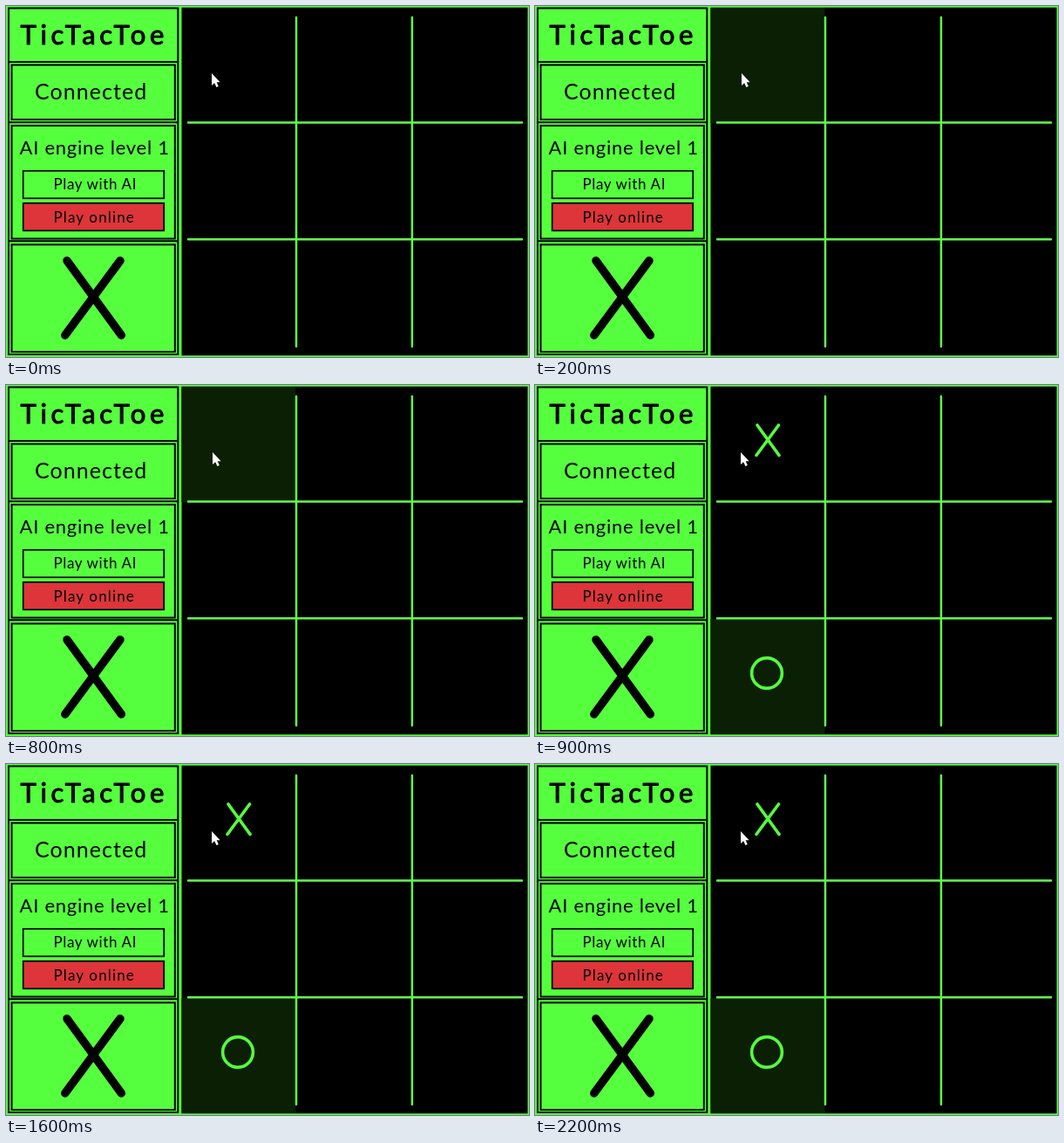
Animation of 600x402 px, one loop 2300 ms. Source, as an HTML page:

```html
<!DOCTYPE html>
<html lang="en">
<head>
<meta charset="utf-8">
<title>Tic-tac-toe</title>
<style>
  html, body { margin: 0; width: 100%; height: 100%; overflow: hidden; background: #55ff3d; }
  svg { display: block; width: 600px; height: 402px; }
  text { font-family: Lato, "Open Sans", sans-serif; fill: #000; }
  .title { stroke: #000; stroke-width: 1; stroke-linejoin: round; }
  .frame { fill: none; stroke: #000; stroke-width: 2; }
  .button { stroke-width: 1.7; }
  .mark, .grid { fill: none; stroke: #55ff3d; stroke-linecap: round; }
  .mark { stroke-width: 3.6; }
  .grid { stroke: #62fb4e; stroke-width: 2.5; }
  .hover { fill: #0a1f03; }
</style>
</head>
<body>
<svg viewBox="0 0 600 402">
  <rect width="600" height="402" fill="#55ff3d"/>

  <g class="frame">
    <path d="M3 2.5H197.3V399H3ZM3 64H197M3 133.3H197M3 269.3H197"/>
    <rect x="6.5" y="67.5" width="187.3" height="62.5"/>
    <rect x="6.5" y="137" width="187.3" height="129.5"/>
    <rect x="6.5" y="273.3" width="187.3" height="122.7"/>
    <rect class="button" x="19.7" y="188.8" width="161.5" height="31.5"/>
    <rect class="button" x="19.7" y="225.8" width="161.5" height="31.5" fill="#dd3539"/>
    <path d="M70 291.7L132.3 377M131 291.7L67.8 377" stroke-width="9.5" stroke-linecap="round"/>
  </g>

  <text class="title" x="16.5" y="43.5" font-size="31" letter-spacing="4.7">TicTacToe</text>
  <text x="33" y="107" font-size="25" letter-spacing="1.05">Connected</text>
  <text x="15.5" y="170" font-size="22" letter-spacing=".74">AI engine level 1</text>
  <text x="54.5" y="210" font-size="17" letter-spacing=".65">Play with AI</text>
  <text x="54.5" y="248" font-size="17" letter-spacing="1.15">Play online</text>

  <rect x="201.5" y="1.7" width="397" height="398.6" fill="#000"/>
  <rect id="hover" class="hover" x="201.5" width="131" height="132"/>
  <path class="grid" d="M333 13V390M465.9 13V390M209 133.4H592M209 267.3H592"/>
  <g id="marks" class="mark">
    <path d="M255 46L280 80.5M279.5 46L254 80.5"/>
    <circle cx="266" cy="330" r="17.4"/>
  </g>
  <path id="cursor" d="M0 0V14L3.2 11.2L5.4 16L7.8 15L5.7 10.3H9.6Z" fill="#fff"/>
</svg>
<script>
  const LOOP = 2300, POINT_AT = 100, PLAY_AT = 900;
  const byId = id => document.getElementById(id);
  const hover = byId('hover'), marks = byId('marks'), cursor = byId('cursor');

  function draw(time) {
    const pointing = time >= POINT_AT && time < PLAY_AT;
    const played = time >= PLAY_AT;
    hover.setAttribute('visibility', pointing || played ? 'visible' : 'hidden');
    hover.setAttribute('y', played ? 268 : 2);
    marks.setAttribute('visibility', played ? 'visible' : 'hidden');
    cursor.setAttribute('transform', `translate(${pointing ? 237 : 236} 77)`);
  }

  const start = performance.now();
  function tick() {
    draw((performance.now() - start) % LOOP);
    requestAnimationFrame(tick);
  }
  tick();
</script>
</body>
</html>
```
